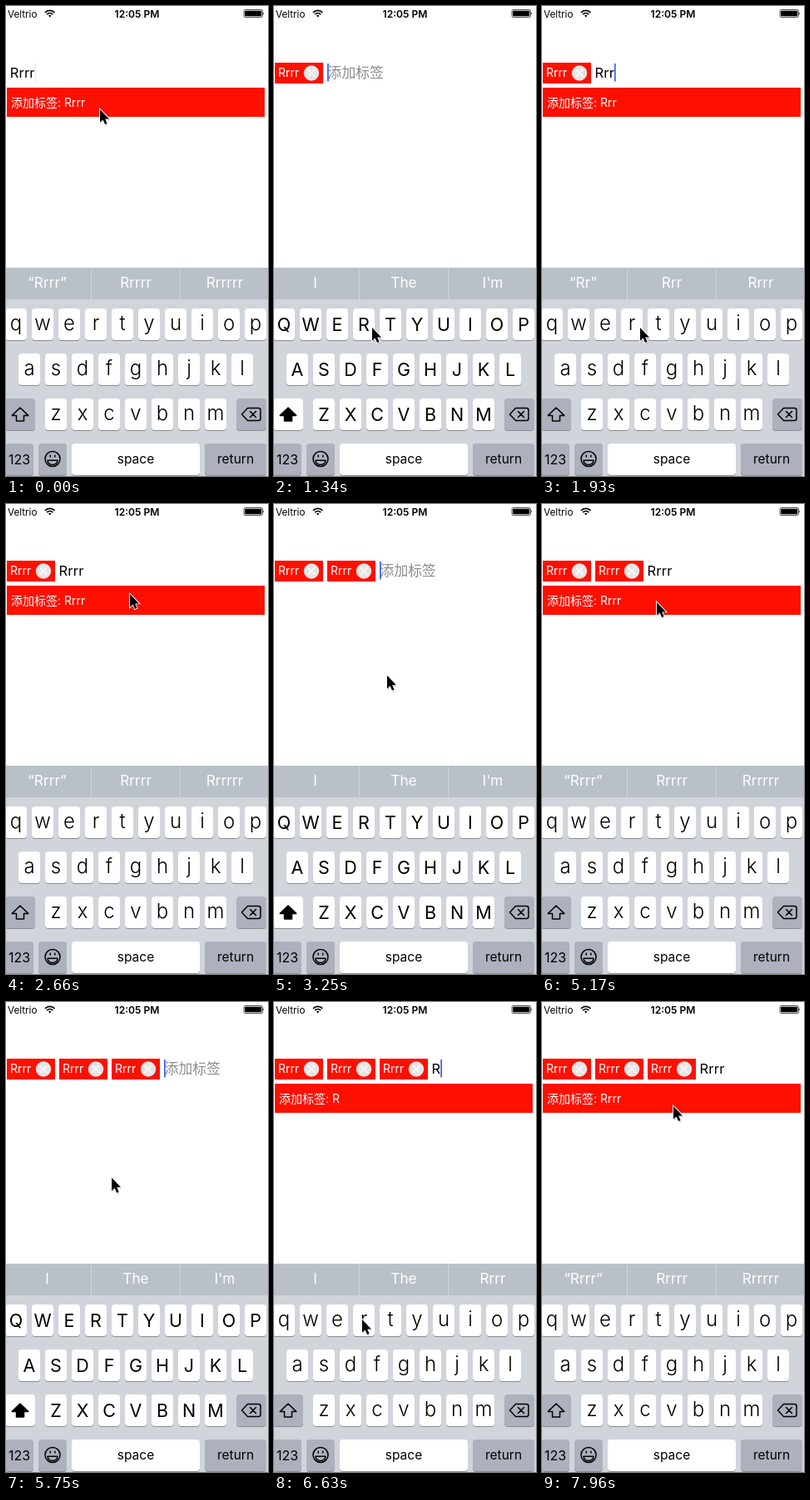
An HTML page for the animation above (8 s loop, 315 by 564 pixels).

```html
<!DOCTYPE html>
<html lang="zh">
<head>
<meta charset="utf-8">
<title>Tag input</title>
<style>
html, body { margin: 0; width: 100%; height: 100%; overflow: hidden; background: #fff; }
svg { display: block; width: 100vw; height: 100vh; font-family: Inter, "Noto Sans CJK SC", sans-serif; }
text { white-space: pre; }
.mid { text-anchor: middle; }
.line { fill: none; stroke: #000; stroke-width: 1.5; stroke-linejoin: round; stroke-linecap: round; }
</style>
</head>
<body>
<svg id="stage" viewBox="0 0 315 564">
  <text x="2" y="13.5" font-size="11.7">Veltrio</text>
  <g fill="none" stroke="#000" stroke-width="1.8">
    <path d="M47 7.8a8 8 0 0 1 11.4 0M49.2 10a5 5 0 0 1 7 0"/>
    <path d="M51 11.6a2.5 2.5 0 0 1 3.4 0L52.7 13.4Z" fill="#000" stroke="none"/>
  </g>
  <text class="mid" x="157.5" y="13.5" font-size="12.1" font-weight="600">12:05 PM</text>
  <rect x="286" y="4.5" width="22.5" height="9" rx="1.8" fill="none" stroke="#000" stroke-width=".7"/>
  <rect x="287.2" y="5.7" width="20.1" height="6.6" rx=".7"/>
  <path d="M309.4 7.4q1.6 1.6 0 3.2Z"/>
  <g id="tags"></g>
  <text id="field" y="86" font-size="16.5"></text>
  <rect id="caret" y="69" width="1.8" height="21.5" fill="#4264f0"/>
  <g id="bar">
    <rect x="1" y="98" width="310" height="35" fill="#fd1000"/>
    <text id="barText" x="6" y="120.5" font-size="14" fill="#fff"></text>
  </g>
  <rect y="314" width="315" height="38" fill="#b9c0c8"/>
  <path d="M102.5 314V352M209.5 314V352" stroke="#d0d4da"/>
  <g id="hints"></g>
  <rect y="352" width="315" height="212" fill="#d0d4db"/>
  <g id="keys"></g>
  <path id="arrow" class="line" d="M17 482L7.3 491.4H12.5V498H21.5V491.4H26.7Z"/>
  <path class="line" d="M290.5 482.5H303.5a2.5 2.5 0 0 1 2.5 2.5V495a2.5 2.5 0 0 1-2.5 2.5H290.5L283.5 490ZM293.5 486.5L300.5 493.5M300.5 486.5L293.5 493.5"/>
  <g class="line" stroke-width="1.3">
    <circle cx="56" cy="543.5" r="9"/>
    <path d="M50 545.2H62a6 5.4 0 0 1-12 0ZM53.2 539.3v1.6M58.8 539.3v1.6"/>
  </g>
  <g id="mouse">
    <path d="M1 1.5V17.5L4.6 14.2L7 20L9.6 19L7.2 13.3H12Z" opacity=".2"/>
    <path d="M0 0V15.8L3.6 12.4L6 18L8.6 17L6.2 11.4H11Z" stroke="#fff" stroke-width="1.8" paint-order="stroke"/>
  </g>
</svg>
<script>
const LOOP = 8000, TICK = 147.3, RED = '#fd1000';
const $ = id => document.getElementById(id);

function add(parent, tag, attrs, text = '') {
  const el = document.createElementNS('http://www.w3.org/2000/svg', tag);
  for (const k in attrs) el.setAttribute(k, attrs[k]);
  el.textContent = text;
  return parent.appendChild(el);
}

// Keyboard
const letters = [];
function key(x, y, width, fill = '#fff') {
  add($('keys'), 'rect', { x, y: y + 1, width, height: 38, rx: 4, fill: '#898b91' });
  return add($('keys'), 'rect', { x, y, width, height: 38, rx: 4, fill });
}
[['qwertyuiop', -1], ['asdfghjkl', 15], ['zxcvbnm', 47]].forEach(([row, x0], r) => {
  [...row].forEach((char, i) => {
    const x = x0 + 32 * i, y = 363 + 54 * r;
    key(x, y, 26);
    letters.push({ char, y, el: add($('keys'), 'text', { x: x + 13, class: 'mid' }) });
  });
});
const GRAY = '#acb1bd';
const shift = key(-1, 471, 36);
key(277, 471, 36, GRAY);
[[-1, 34, '123', GRAY, 16], [39, 34, '', GRAY, 16], [79, 154, 'space', '#fff', 15.5], [239, 74, 'return', GRAY, 15.5]]
  .forEach(([x, w, label, fill, size]) => {
    key(x, 525, w, fill);
    add($('keys'), 'text', { x: x + w / 2, y: label === '123' ? 550 : 549, 'font-size': size, class: 'mid' }, label);
  });

const hints = [49.5, 156, 263].map(x =>
  add($('hints'), 'text', { x, y: 337.5, 'font-size': 17.2, fill: '#fff', class: 'mid' }));

const tags = [0, 1, 2].map(i => {
  const g = add($('tags'), 'g', { transform: `translate(${63 * i})` });
  add(g, 'rect', { x: 1, y: 68, width: 58, height: 25, fill: RED });
  add(g, 'text', { x: 5, y: 85.2, 'font-size': 14, fill: '#fff' }, 'Rrrr');
  add(g, 'circle', { cx: 45, cy: 80.5, r: 9.2, fill: '#e6e4e4' });
  add(g, 'path', { d: 'M40.5 76L49.5 85M49.5 76L40.5 85', stroke: '#fff', 'stroke-width': 1.4 });
  return g;
});

// [tick, tag count, typed text, text behind the hints, capitals]
const states = [
  [0, 0, 'Rrrr', 'Rrrr'],
  [2, 1, '', '', true], [10, 1, '', ''], [11, 1, 'R', 'R'], [12, 1, 'Rr', 'R'],
  [13, 1, 'Rrr', 'Rr'], [14, 1, 'Rrrr', 'Rrr'], [17, 1, 'Rrrr', 'Rrrr'],
  [21, 2, '', '', true], [27, 2, '', ''], [28, 2, 'R', 'R'], [29, 2, 'Rr', 'R'],
  [30, 2, 'Rrr', 'Rr'], [31, 2, 'Rrrr', 'Rrr'], [33, 2, 'Rrrr', 'Rrrr'],
  [38, 3, '', '', true], [45, 3, 'R', 'R'], [46, 3, 'Rr', 'R'],
  [47, 3, 'Rrr', 'Rr'], [48, 3, 'Rrrr', 'Rrr'], [50, 3, 'Rrrr', 'Rrrr']
];
// [tick, caret opacity]
const blinks = [[0, .12], [1, 0], [2, 1], [6, 0], [9, 1], [17, 0], [21, 1], [24, 0], [26, 1],
  [34, 0], [38, 1], [41, 0], [44, 1], [53, 0]];
// [tick, x, y]
const moves = [[0, 113, 124], [2, 113, 124], [7, 117, 386], [9, 118, 386], [13, 118, 386],
  [16, 146, 113], [18, 149, 108], [20, 149, 108], [25, 112, 386], [30, 112, 386], [35, 138, 118],
  [37, 138, 118], [42, 107, 382], [45, 106, 381], [48, 106, 381], [53, 155, 126], [54, 158, 125]];

const at = (list, n) => list.findLast(s => s[0] <= n);

function pointer(n) {
  const i = moves.findLastIndex(m => m[0] <= n);
  const a = moves[i], b = moves[i + 1] || a;
  const u = (n - a[0]) / (b[0] - a[0] || 1), e = u * u * (3 - 2 * u);
  return [1, 2].map(k => a[k] + (b[k] - a[k]) * e);
}

function hintWords(base) {
  if (base.length < 2) return ['I', 'The', base ? 'Rrrr' : "I'm"];
  return [`“${base}”`, base + 'r', base + 'rr'];
}

function draw(n) {
  const [, count, typed, base, caps] = at(states, n);
  const x = count ? 63 * count + .6 : 4.8;
  tags.forEach((g, i) => g.setAttribute('visibility', i < count ? 'visible' : 'hidden'));

  const field = $('field');
  field.textContent = typed || '添加标签';
  field.setAttribute('x', typed ? x : x + 1);
  field.setAttribute('fill', typed ? '#000' : '#8b8b8b');
  field.setAttribute('font-size', typed ? 16.5 : 16.8);
  $('caret').setAttribute('x', x + (typed ? field.getComputedTextLength() : .4));
  $('caret').setAttribute('opacity', at(blinks, n)[1]);

  $('bar').setAttribute('visibility', typed ? 'visible' : 'hidden');
  $('barText').textContent = '添加标签: ' + typed;
  hintWords(base).forEach((word, i) => hints[i].textContent = word);

  for (const { char, y, el } of letters) {
    el.textContent = caps ? char.toUpperCase() : char;
    el.setAttribute('y', y + (caps ? 27 : 25.5));
    el.setAttribute('font-size', caps ? 21.5 : 24);
    el.setAttribute('font-weight', caps ? 400 : 300);
  }
  shift.setAttribute('fill', caps ? '#fff' : GRAY);
  $('arrow').style.fill = caps ? '#000' : 'none';
  $('mouse').setAttribute('transform', `translate(${pointer(n)})`);
}

let last = -1;
function frame() {
  const n = Math.floor(performance.now() % LOOP / TICK + .06);
  if (n !== last) draw(last = n);
  requestAnimationFrame(frame);
}
frame();
</script>
</body>
</html>
```
